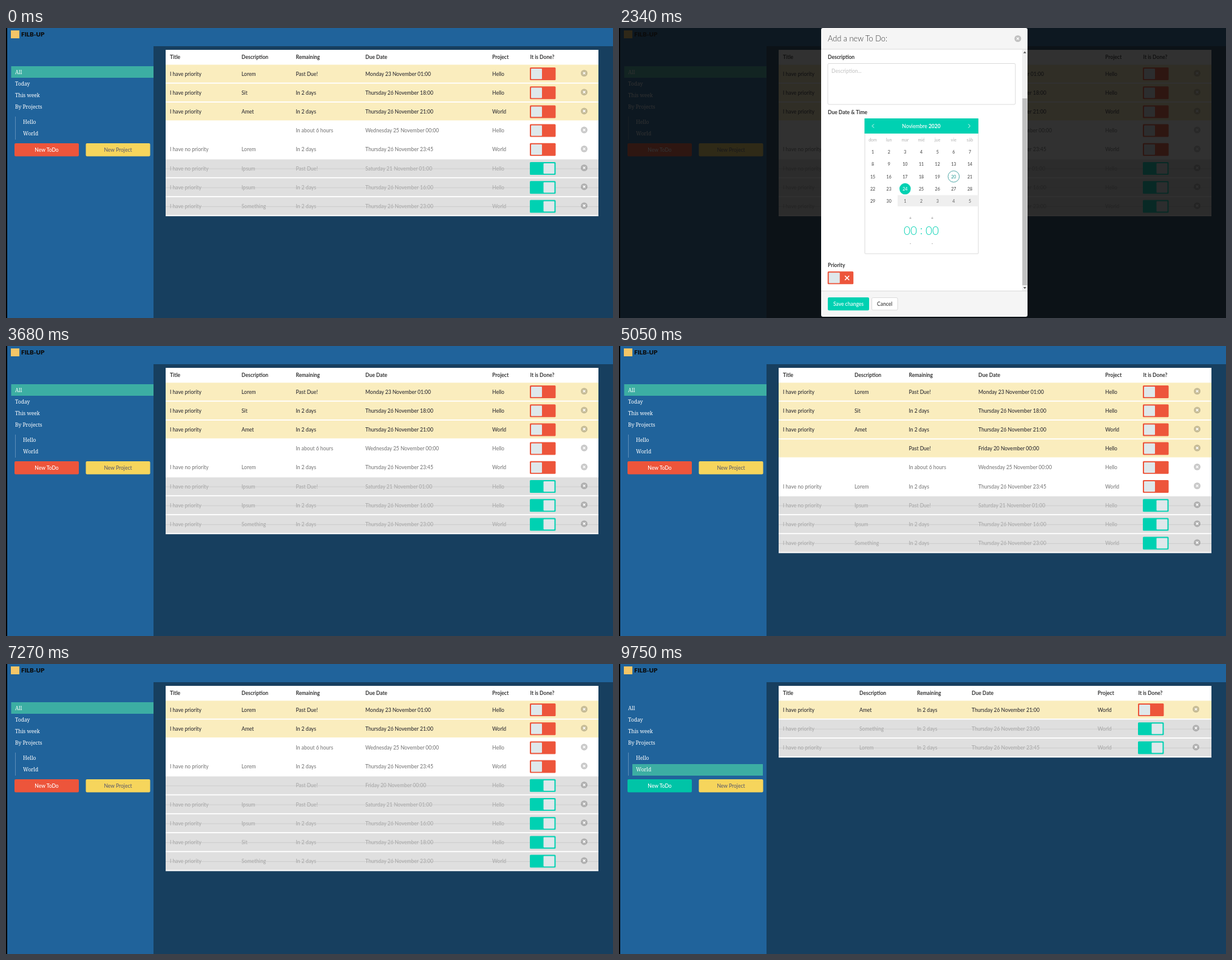
Write an HTML page that moves like this. It is 1000 by 478 pixels and loops after 10 s.

```html
<!DOCTYPE html>
<html lang="en">
<head>
<meta charset="utf-8">
<title>To-do board</title>
<style>
  html, body { margin: 0; width: 100%; height: 100%; overflow: hidden; background: #000; }
  svg { display: block; width: 1000px; height: 478px; font: 500 8.53px Lato, sans-serif; }
  text { white-space: pre; }
  .side { font: 500 8.53px "Noto Serif", serif; }
  .brand { font-weight: 900; font-size: 10px; }
  .bold { font-weight: 700; }
  .light { font-weight: 300; }
  .mid { text-anchor: middle; }
  .day { font-size: 7px; }
  .head { font-size: 12.8px; }
  .clock { font-size: 19px; }
</style>
</head>
<body>
<svg id="stage" viewBox="0 0 1000 478"></svg>
<script>
const LOOP = 10000;
const BLUE = '#20639b', NAVY = '#173f5f', TEAL = '#3caea3', RED = '#ed553b',
      YELLOW = '#f6d55c', GREEN = '#00d1b2', KNOB = '#dfe8eb', INK = '#363636', LINE = '#dbdbdb';

// id: title, description, remaining, due date, project, priority
const P = 'I have priority', N = 'I have no priority', SOON = 'In 2 days', LATE = 'Past Due!';
const thursday = time => 'Thursday 26 November ' + time;
const TASKS = {
  a: [P, 'Lorem', LATE, 'Monday 23 November 01:00', 'Hello', 1],
  b: [P, 'Sit', SOON, thursday('18:00'), 'Hello', 1],
  c: [P, 'Amet', SOON, thursday('21:00'), 'World', 1],
  d: ['', '', 'In about 6 hours', 'Wednesday 25 November 00:00', 'Hello', 0],
  e: [N, 'Lorem', SOON, thursday('23:45'), 'World', 0],
  f: [N, 'Ipsum', LATE, 'Saturday 21 November 01:00', 'Hello', 0],
  g: [P, 'Ipsum', SOON, thursday('16:00'), 'Hello', 1],
  h: [P, 'Something', SOON, thursday('23:00'), 'World', 1],
  i: ['', '', LATE, 'Friday 20 November 00:00', 'Hello', 1]
};
const HEADS = ['Title', 'Description', 'Remaining', 'Due Date', 'Project', 'It is Done?'];
const WIDE = [270, 388, 477.5, 592, 801, 863.5, 952.5];
const NARROW = [270, 396, 491, 581, 788.5, 855.5, 950.5];

// Each step changes a few fields; an upper-case id in list is a finished task.
const STEPS = [
  [0, { list: 'abcdeFGH', cols: WIDE, active: 'All', hover: '', flip: '', turn: 0,
        modal: 0, scroll: 0, over: 0, pick: 0, urgent: 0, add: 0 }],
  [1000, { modal: .5 }], [1120, { modal: 1 }],
  [1620, { scroll: .08 }], [1740, { scroll: .27 }], [1860, { scroll: .48 }],
  [1980, { scroll: .7 }], [2100, { scroll: .9 }], [2220, { scroll: 1 }],
  [2340, { over: 20 }], [2460, { pick: .5 }], [2580, { pick: 1 }],
  [2700, { over: 27 }], [2820, { over: 0 }],
  [3320, { urgent: .5 }], [3440, { urgent: 1 }], [3560, { modal: .5 }], [3680, { modal: 0 }],
  [5050, { list: 'abcideFGH' }],
  [5920, { flip: 'b', turn: .35 }], [6040, { turn: .8 }], [6160, { turn: 1 }],
  [6410, { list: 'iacdeFGBH', flip: '' }],
  [6780, { flip: 'i', turn: .35 }], [6900, { turn: .8 }], [7020, { turn: 1 }],
  [7270, { list: 'acdeIFGBH', flip: '' }],
  [7770, { flip: 'e', turn: .35 }], [7890, { turn: .8 }], [8010, { turn: 1, hover: 'World' }],
  [8260, { list: 'acdIFGBHE', flip: '', hover: 'Hello' }],
  [8510, { list: 'adIFGB', active: 'Hello', hover: '' }],
  [8760, { hover: 'World' }],
  [9130, { list: 'cHE', cols: NARROW, active: 'World', hover: '' }],
  [9750, { add: 1 }]
];

const rect = (x, y, w, h, fill, r = 0, extra = '') =>
  `<rect x="${x}" y="${y}" width="${w}" height="${h}" rx="${r}" fill="${fill}" ${extra}/>`;
const path = (d, stroke, w = 1) =>
  `<path d="${d}" fill="none" stroke="${stroke}" stroke-width="${w}"/>`;
const text = (x, y, s, fill, cls = '') =>
  `<text x="${x}" y="${y + 3}" fill="${fill}" class="${cls}">${s}</text>`;
const cross = (x, y, r, color, w) =>
  path(`M${x - r} ${y - r}l${2 * r} ${2 * r}m0 ${-2 * r}l${-2 * r} ${2 * r}`, color, w);
const closer = (x, y) =>
  `<circle cx="${x}" cy="${y}" r="5.5" fill="#0a0a0a" fill-opacity=".22"/>` + cross(x, y, 1.9, '#fff', 1.3);
const field = (x, y, w, h) => rect(x, y, w, h, '#fff', 2, `stroke="${LINE}"`);

function mix(a, b, k) {
  const part = (c, i) => parseInt(c.slice(i, i + 2), 16);
  return `rgb(${[1, 3, 5].map(i => Math.round(part(a, i) + (part(b, i) - part(a, i)) * k))})`;
}

const toggle = (x, y, k) =>
  rect(x, y - 10.5, 42.5, 21, mix(RED, GREEN, k), 1.5) +
  rect(x + 2 + 20.5 * k, y - 8.5, 18, 17.2, KNOB, 1);

function sidebar(s) {
  let out = rect(2, 0, 998, 30, BLUE) + rect(2, 30, 241, 448, BLUE) +
    rect(8, 4, 14, 13, '#f4c667') + text(25, 10.7, 'FILB-UP', '#0a0a0a', 'brand');
  if (s.active === 'All') out += rect(8.5, 63, 234.5, 19, TEAL);
  ['All', 'Today', 'This week', 'By Projects'].forEach((name, i) => {
    out += text(15, 72.5 + 19.1 * i, name, '#fff', 'side');
  });
  out += rect(15, 146, 1, 38, '#5c8db8');
  ['Hello', 'World'].forEach((name, i) => {
    const lit = s.hover === name, y = 146 + 19 * i;
    if (lit || s.active === name) out += rect(22, y, 215, 19, lit ? '#f5f5f5' : TEAL);
    out += text(28, y + 9.4, name, lit ? '#4a4a4a' : '#fff', 'side');
  });
  return out +
    rect(14, 190, 106, 21.5, s.add ? '#00c4a7' : RED, 2) + text(67, 201, 'New ToDo', '#fff', 'mid') +
    rect(131.5, 190, 106, 21.5, YELLOW, 2) + text(184.5, 201, 'New Project', '#62606c', 'mid');
}

function table(s) {
  const x = s.cols;
  let out = rect(263, 36, 713, 24.6 + 31.2 * s.list.length, '#fff');
  HEADS.forEach((name, i) => out += text(x[i], 48, name, INK, 'bold'));
  [...s.list].forEach((id, i) => {
    const task = TASKS[id.toLowerCase()], done = id < 'a';
    const top = 60.5 + 31.2 * i, y = top + 15;
    const ink = done ? '#aaa' : task[5] ? '#302f35' : '#7c7c7c';
    if (done || task[5]) out += rect(263, top, 713, 29.4, done ? '#dfdfdf' : '#faedbe');
    if (done) out += rect(263, y, 713, 1, '#cdcdcd');
    for (let c = 0; c < 5; c++) out += text(x[c], y, task[c], ink);
    out += toggle(x[5] - .5, y, done ? 1 : s.flip === id ? s.turn : 0) + closer(x[6], y - 1);
  });
  return out;
}

function calendar(s) {
  let out = rect(405, 149.5, 187, 222.5, '#fff', 1, `stroke="${LINE}"`) +
    rect(404.5, 149, 187.5, 25, GREEN) +
    text(498, 162, 'Noviembre <tspan class="bold">2020</tspan>', '#fff', 'mid') +
    path('M420 158.5l-3 3 3 3M575.5 158.5l3 3-3 3', '#fff', .9) +
    rect(459, 275.5, 133, 18.5, '#efefef');
  ['dom', 'lun', 'mar', 'mié', 'jue', 'vie', 'sáb'].forEach((d, i) => {
    out += text(418 + 26.67 * i, 183.5, d, '#b8b8b8', 'day mid');
  });
  for (let n = 0; n < 35; n++) {
    const x = 418 + 26.67 * (n % 7), y = 204.3 + 20.25 * Math.floor(n / 7);
    const day = n < 30 ? n + 1 : n - 29;
    const fill = n === 19 ? s.pick : n === 23 ? 1 - s.pick : 0;
    const ring = s.over === n + 1;
    if (fill || ring) out += `<circle cx="${x}" cy="${y}" r="9.3" fill="${GREEN}" fill-opacity="${fill}"` +
      (ring ? ' stroke="#3f9f9f" stroke-width=".9"/>' : '/>');
    const ink = fill ? '#fff' : ring || n === 23 ? '#2f9f98' : n < 30 ? '#4a4a4a' : '#686868';
    out += text(x, y - .3, day, ink, 'day mid');
  }
  for (const x of [480, 516]) {
    out += text(x, 313, '+', '#8a8a8a', 'day mid') + text(x, 337.5, '00', GREEN, 'clock light mid') +
      text(x, 355, '-', '#8a8a8a', 'day mid');
  }
  return out + text(498, 336.5, ':', GREEN, 'clock light mid');
}

function form(s) {
  const label = (y, name) => text(344, y, name, INK, 'bold');
  const hint = (y, name) => text(350, y, name, '#c6c6c6');
  return label(-45, 'Title') + field(344, -34.5, 309, 21.5) + hint(-24, 'Title...') +
    label(1.5, 'Project') + field(344, 12, 64, 21.5) + text(350, 22.5, 'Hello', INK) +
    path('M396 20.5l3 3 3-3', GREEN, 1.2) +
    label(48, 'Description') + field(344, 58.5, 309, 67.5) + hint(71, 'Description...') +
    label(139, 'Due Date &amp; Time') + calendar(s) +
    label(391, 'Priority') + toggle(343.7, 411.7, s.urgent) +
    (s.urgent < .5 ? cross(375.7, 412, 3.5, '#fff', 1.6) : path('M350 412l3 3 5.5-6.5', '#fff', 1.6));
}

function modal(s) {
  const thumb = 44 + 72 * s.scroll;
  return `<g opacity="${s.modal}">` + rect(1, 0, 999, 478, '#0a0a0a', 0, 'fill-opacity=".84"') +
    rect(333, 0, 340, 476, '#f5f5f5', 3) + rect(333, 35, 340, 398.5, '#fff') +
    `<g clip-path="url(#body)"><g transform="translate(0 ${93 * (1 - s.scroll)})">${form(s)}</g></g>` +
    rect(664, 35, 9, 398, '#f1f1f1') + rect(664.5, thumb, 8, 308, '#c1c1c1') +
    '<path d="M666 41.5h5l-2.5-3zM666 427h5l-2.5 3z" fill="#555"/>' +
    rect(333, 34.5, 340, 1, LINE) + rect(333, 433, 340, 1, LINE) +
    text(344, 19, 'Add a new To Do:', INK, 'head light') + closer(657, 17.5) +
    rect(344, 444, 68, 21.5, GREEN, 2) + text(378, 455, 'Save changes', '#fff', 'mid') +
    field(416.5, 444.5, 42.5, 20.5) + text(437.7, 455, 'Cancel', INK, 'mid') + '</g>';
}

const CLIP = '<clipPath id="body"><rect x="333" y="35" width="331" height="398"/></clipPath>';
const stage = document.getElementById('stage');
let fields = {};
const states = STEPS.map(([at, change]) => [at, fields = { ...fields, ...change }]);
const began = performance.now();
let shown = -1;

function tick() {
  const t = (performance.now() - began) % LOOP;
  let i = states.length - 1;
  while (states[i][0] > t) i--;
  if (i !== shown) {
    const s = states[shown = i][1];
    stage.innerHTML = CLIP + rect(0, 0, 1000, 478, NAVY) + rect(0, 0, 2, 478, '#000') +
      sidebar(s) + table(s) + (s.modal ? modal(s) : '');
  }
  requestAnimationFrame(tick);
}
tick();
</script>
</body>
</html>
```
